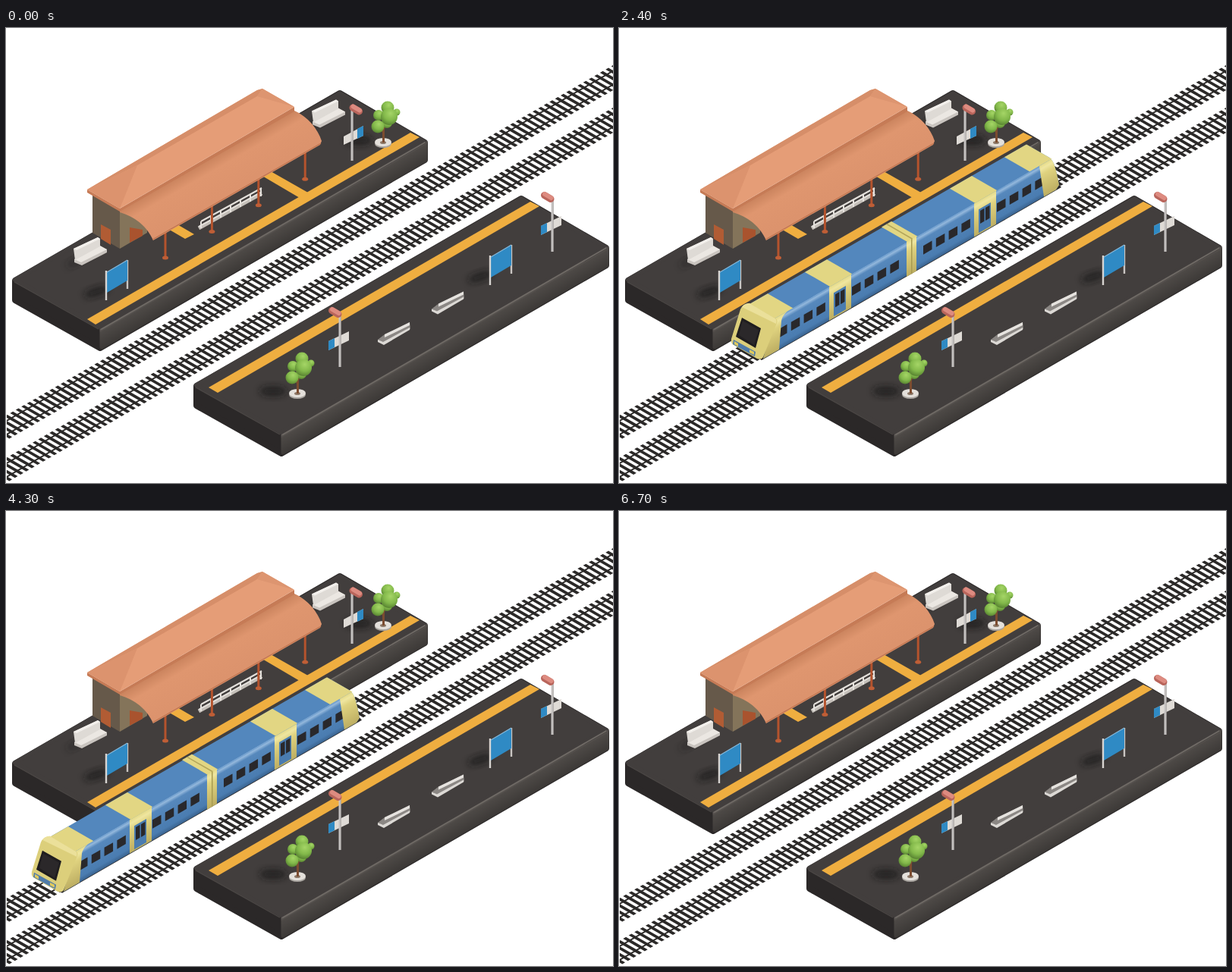
These frames come from a looping animation (800 px wide and 600 px high, 6.8 s). An HTML page:

```html
<!DOCTYPE html>
<html lang="en">
<head>
<meta charset="utf-8">
<title>Isometric railway station</title>
<style>
html, body { margin: 0; width: 100%; height: 100%; overflow: hidden; background: #fff; }
svg { display: block; width: 800px; height: 600px; }
</style>
</head>
<body>
<svg viewBox="0 0 800 600">
  <defs>
    <linearGradient id="edge" gradientUnits="userSpaceOnUse" x1="340" y1="271" x2="355" y2="297">
      <stop offset="0" stop-color="#6a6561"/><stop offset=".18" stop-color="#4d4946"/><stop offset="1" stop-color="#383533"/>
    </linearGradient>
    <linearGradient id="canopyFill" gradientUnits="userSpaceOnUse" x1="264" y1="177" x2="288" y2="218.600">
      <stop offset="0" stop-color="#cc855f"/><stop offset=".3" stop-color="#df966f"/><stop offset="1" stop-color="#dc936d"/>
    </linearGradient>
    <linearGradient id="blueSide" x2="0" y2="1">
      <stop offset="0" stop-color="#6597ca"/><stop offset=".07" stop-color="#94b8dc"/><stop offset=".18" stop-color="#5688bc"/>
      <stop offset=".85" stop-color="#4a7cb0"/><stop offset="1" stop-color="#3a638f"/>
    </linearGradient>
    <linearGradient id="yellowSide" x2="0" y2="1">
      <stop offset="0" stop-color="#e6db88"/><stop offset=".12" stop-color="#efe6a0"/><stop offset=".3" stop-color="#dfd27f"/>
      <stop offset="1" stop-color="#bdae62"/>
    </linearGradient>
    <radialGradient id="leaf" cx=".58" cy=".3" r=".75">
      <stop offset="0" stop-color="#a5d566"/><stop offset=".55" stop-color="#82b84a"/><stop offset="1" stop-color="#527c2e"/>
    </radialGradient>
    <filter id="soft" x="-50%" y="-50%" width="200%" height="200%"><feGaussianBlur stdDeviation="4"/></filter>

    <g id="platform" stroke-linejoin="round">
      <path d="M12 333L440 86L552 151V174L124 422L12 359Z" fill="#2b2828" stroke="#2b2828" stroke-width="8"/>
      <path d="M126 397L553 151V174L126 421Z" fill="url(#edge)" stroke="url(#edge)" stroke-width="5"/>
      <path d="M12 332L440 86L551 150L124 394Z" fill="#423e3d" stroke="#423e3d" stroke-width="6"/>
      <path d="M126 397L552 151" stroke="#6f6a65" stroke-width="1.8" stroke-linecap="round"/>
      <path d="M11 335L122 397" stroke="#4b4745" stroke-width="1.3"/>
    </g>

    <g id="track">
      <path d="M-20 0H960" stroke="#2b2928" stroke-width="33" stroke-dasharray="4.3 4.250"/>
      <path d="M-20 -9H960M-20 9H960" stroke="#2b2928" stroke-width="2.2"/>
    </g>

    <g id="bench">
      <ellipse cx="98" cy="305" rx="20" ry="5" transform="rotate(-28 98 305)" fill="#1d1b1b" opacity=".5" filter="url(#soft)"/>
      <path d="M90 305L124 288L133 292V296L100 313L90 309Z" fill="#c9c4bf"/>
      <path d="M90 305L124 287L133 292L99 309Z" fill="#ebe7e2"/>
      <path d="M89 291L121 276L124 278V288L91 306Z" fill="#dedad5"/>
      <path d="M89 291L121 276L124 278L93 293Z" fill="#f3f0ec"/>
    </g>

    <g id="seat">
      <path d="M490 411L499 404L532 388L533 397L498 417Z" fill="#8b8784"/>
      <path d="M499 404L532 388V392L499 408Z" fill="#e6e3df"/>
      <path d="M490 411L497 414L532 395V398L498 418L490 414Z" fill="#dcd9d5"/>
    </g>

    <g id="board">
      <ellipse cx="119" cy="348" rx="17" ry="6" transform="rotate(-18 119 348)" fill="#171616" opacity=".65" filter="url(#soft)"/>
      <path d="M160 306V344" stroke="#c9c6c3" stroke-width="2.4"/>
      <path d="M133 322L160 306V333L133 349Z" fill="#2f8ac4"/>
      <path d="M133 322L160 306" stroke="#88b9da" stroke-width="1.2"/>
      <path d="M132 320V359" stroke="#d8d5d2" stroke-width="2.4"/>
    </g>

    <g id="lampPost">
      <path d="M440 378V447" stroke="#c8c5c4" stroke-width="3"/>
      <path d="M441.200 378V447" stroke="#9d9a99" stroke-width=".8"/>
    </g>
    <g id="lampHead" stroke-linecap="round">
      <path d="M429.500 372.500L438 377.500" stroke="#b9655b" stroke-width="9"/>
      <path d="M430 371L438.500 376" stroke="#dd8b80" stroke-width="6"/>
    </g>
    <g id="lampWithSign">
      <path d="M425 413L452 400V412L425 425Z" fill="#dfdbd6"/>
      <path d="M425 413L433 409V421L425 425Z" fill="#2f8ac4"/>
      <use href="#lampPost"/><use href="#lampHead"/>
    </g>

    <g id="tree">
      <ellipse cx="465" cy="148" rx="18" ry="7" fill="#171616" opacity=".65" filter="url(#soft)"/>
      <ellipse cx="497" cy="152.500" rx="11" ry="5.500" fill="#aaa6a1"/>
      <ellipse cx="497" cy="150.500" rx="11" ry="5.500" fill="#e4e0db"/>
      <ellipse cx="497" cy="151" rx="4" ry="2" fill="#8c7868"/>
      <path d="M497.500 151V133L503 124M497.500 137L491 131" fill="none" stroke="#7c4c30" stroke-width="3"/>
      <g id="leaves" fill="url(#leaf)"></g>
    </g>

    <g id="post">
      <path d="M210 262V303" stroke="#b5532d" stroke-width="3"/>
      <ellipse cx="210" cy="303" rx="4" ry="2.500" fill="#bf5e36"/>
    </g>
    <clipPath id="stage"><rect x="1" width="799" height="600"/></clipPath>
  </defs>

  <g clip-path="url(#stage)">
    <use href="#track" transform="matrix(.866 -.5 .866 .5 0 527.500)"/>
    <use href="#track" transform="matrix(.866 -.5 .866 .5 0 583.500)"/>

    <use href="#platform"/>
    <g fill="#efae40">
      <path d="M107 384L533 138L545 144L118 391Z"/>
      <path d="M336 194L347 188L398 217L387 224Z"/>
      <path d="M200 257L212 251L248 272L236 278Z"/>
    </g>
    <use href="#bench"/>
    <use href="#bench" x="314" y="-181.500"/>
    <use href="#board"/>
    <use href="#tree"/>
    <path d="M445 143L471 129V142L445 154Z" fill="#dfdbd6"/>
    <path d="M463 133L471 129V142L463 146Z" fill="#2f8ac4"/>
    <use href="#lampPost" x="16" y="-272"/>
    <use href="#lampHead" x="27.500" y="-267.500"/>

    <g id="station">
      <path d="M114 218L150 240V291L114 270Z" fill="#66594a"/>
      <path d="M150 240L186 260V270L150 291Z" fill="#84745a"/>
      <path d="M125 259L138 266V286L125 278Z" fill="#b15c34"/>
      <path d="M163 263L180 266V274L163 283Z" fill="#a9532e"/>
      <g fill="none" stroke="#e5e1dc">
        <path d="M254 264L337 218" stroke="#c4bfb9" stroke-width="5"/>
        <path d="M254 262L337 216" stroke-width="2"/>
        <path d="M257 255L337 211M257 255V264M270 248V257M283 241V250M296 233V243M309 226V236M322 219V229M336 212V222" stroke-width="2"/>
      </g>
      <g id="posts"></g>
      <path d="M150 241L380 109C398 117 411 133 416 149L414 154L194 280C187 264 172 249 150 243Z" fill="url(#canopyFill)"/>
      <path d="M193 279L415 152" stroke="#c0744f" stroke-width="1.2"/>
      <path d="M107 213L150 238L380 104V110L150 242L107 217Z" fill="#c67b56"/>
      <path d="M107 213L331 82L338 80L380 104L150 238Z" fill="#e59d77"/>
      <path d="M107 213L331 82L338 80L331 90L173 181Z" fill="#d68e69"/>
      <path d="M107 213L173 181L150 238Z" fill="#dc936e"/>
      <path d="M331 90L338 80L380 104Z" fill="#dd9570"/>
    </g>

    <g id="train"></g>

    <use href="#platform" x="239" y="139"/>
    <path d="M267 474L691 229L703 235L279 481Z" fill="#efae40"/>
    <use href="#lampWithSign" x="280" y="-152"/>
    <use href="#board" x="506" y="-20"/>
    <use href="#seat" x="71" y="-40.500"/>
    <use href="#seat"/>
    <use href="#lampWithSign"/>
    <use href="#tree" x="-113" y="331"/>
  </g>
</svg>
<script>
const SLOPE = 0.577, LOOP = 6800, STEP = 100;
const byId = id => document.getElementById(id);
const rect = (x, y, w, h, fill) => `<rect x="${x}" y="${y}" width="${w}" height="${h}" fill="${fill}"/>`;
const shape = (d, fill) => `<path d="${d}" fill="${fill}"/>`;

byId('leaves').innerHTML = [[515, 111, 4.5], [503, 105, 8.5], [491, 115, 7], [502, 125, 7], [505, 117, 11], [490, 130, 8.5]]
  .map(([x, y, r]) => `<circle cx="${x}" cy="${y}" r="${r}"/>`).join('');
byId('posts').innerHTML = [0, 1, 2, 3]
  .map(i => `<use href="#post" x="${i * 61.4}" y="${-i * 34.6}"/>`).join('');

// x runs along the train; y is height on the side and width on the roof.
const onSide = body => `<g transform="matrix(1 ${-SLOPE} 0 1 190 436)">${body}</g>`;
const onRoof = body => `<g transform="matrix(1 ${-SLOPE} 1 ${SLOPE} 172 364)">${body}</g>`;

function carSide(x) {
  const sideWindows = [20, 117].map(start => [0, 1, 2, 3]
    .map(i => rect(x + start + i * 16.8, -27, 11.5, 11.5, '#29282b')).join('')).join('');
  return sideWindows
    + rect(x + 87, -44, 29, 44, 'url(#yellowSide)')
    + rect(x + 93, -33, 16, 31, '#4a7cb0')
    + rect(x + 95, -30, 5.5, 17, '#29282b') + rect(x + 102, -30, 5.5, 17, '#29282b');
}

function buildTrain() {
  const blueRoof = '#5387bd', yellowRoof = '#e2d683';
  const shadow = shape('M150 416L188 438L583 210L570 195Z', '#2a2828');
  const roof = onRoof(
    `<rect x="0" y="0" width="365" height="33.500" rx="3" fill="${blueRoof}"/>`
    + rect(0, 0, 24, 33.5, yellowRoof) + rect(73, 0, 29, 33.5, yellowRoof)
    + rect(264, 0, 29, 33.5, yellowRoof) + rect(336, 0, 29, 33.5, yellowRoof)
    + rect(175, -1, 13, 34.5, yellowRoof) + rect(181, -1, 1.5, 34.5, '#b3a55a'));
  const side = onSide(
    shape('M15 -44H379Q384 -40 390 -4L386 0H0Z', 'url(#blueSide)')
    + carSide(0) + carSide(191)
    + shape('M15 -44H32Q25 -42 24 -36L21 0H0Z', 'url(#yellowSide)')
    + rect(189, -45, 13, 46, 'url(#yellowSide)') + rect(195, -45, 1.5, 46, '#a89b51')
    + shape('M364 -44H379Q384 -40 390 -4L386 0H370Z', 'url(#yellowSide)'));
  const cab =
    shape('M172 363Q163 364 160 371L148 410Q147 416 151 418L182 436Q188 438 190 434L208 389Q210 384 204 382Z', '#dccf7b')
    + shape('M172 363L204 382Q209 384 207 390L162 368Q165 363 172 363Z', '#ebe09a')
    + shape('M162 382L187 396L180 422L154 407Z', '#1f1d1f')
    + shape('M163 386L184 398L178 418L158 405Z', '#2b282a')
    + shape('M151 411L180 427L179 433L150 417Z', '#4f7ba9')
    + shape('M152 413L157 416V420L152 417ZM172 424L178 427V431L172 428Z', '#dfca5e');
  byId('train').innerHTML = shadow + roof + side + cab;
}

// Brakes to a stop at 1.6 s, then pulls away along the mirrored curve.
function trainOffset(ms) {
  const travel = 1532, duration = 1600, departure = 3734;
  const glide = d => travel * Math.pow(Math.max(0, d) / duration, 2.5);
  return glide(duration - ms) - glide(ms - departure);
}

function render(now) {
  const ms = Math.floor((now % LOOP) / STEP) * STEP;
  const x = trainOffset(ms);
  byId('train').setAttribute('transform', `translate(${x.toFixed(2)} ${(-x * SLOPE).toFixed(2)})`);
}

buildTrain();
const start = performance.now();
function tick() {
  render(performance.now() - start);
  requestAnimationFrame(tick);
}
tick();
</script>
</body>
</html>
```
